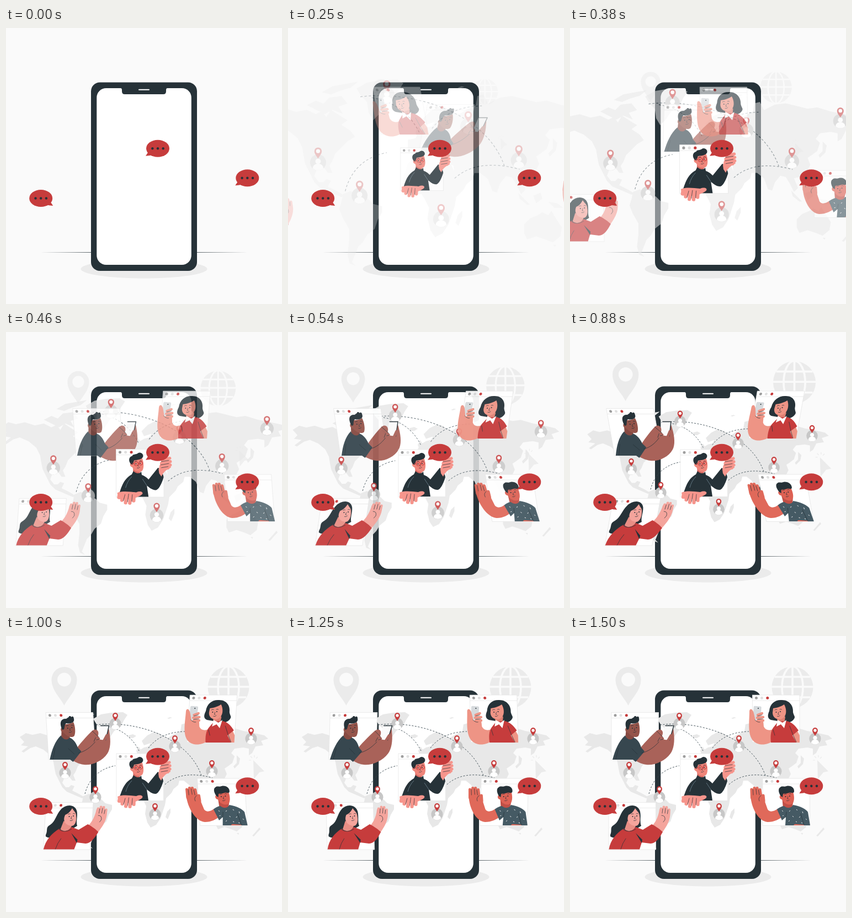
These frames come from a looping animation (500 px wide and 500 px high, 1.54 s). An HTML page:

```html
<!DOCTYPE html>
<html lang="en">
<head>
<meta charset="utf-8">
<title>Chatting around the world</title>
<style>
  html, body { margin: 0; height: 100%; overflow: hidden; background: #fafafa; }
  svg { display: block; width: 100vw; height: 100vh; }
  .dark { fill: #263238; }
  .red { fill: #c63c3c; }
  .pale { fill: #ebebeb; }
  .ink { fill: none; stroke: #263238; stroke-width: .7; stroke-linecap: round; stroke-linejoin: round; }
  .fingers { fill: none; stroke-linecap: round; stroke-linejoin: round; }
  .land { fill: #e8e8e8; }
  .route { fill: none; stroke: #37474f; stroke-width: .9; stroke-dasharray: 3 2.6; }
</style>
</head>
<body>
<svg viewBox="0 0 500 500">
  <defs>
    <g id="bubble">
      <path class="red" d="M-17 6L-22 13.5Q-14 13-8 11Z"/>
      <ellipse class="red" rx="21" ry="15.5"/>
      <g class="dark"><circle cx="-9.7" r="2.2"/><circle r="2.2"/><circle cx="9.7" r="2.2"/></g>
    </g>
    <g id="pin">
      <circle cy="14" r="10.6" fill="#c7c7c7"/>
      <path d="M-7 21.8C-7 13.5 7 13.5 7 21.8A10.6 10.6 0 0 1-7 21.8Z" fill="#fff"/>
      <circle cy="12.5" r="3.6" fill="#fff"/>
      <path class="red" d="M0 9C-2 5-4.9 3-4.9-1A4.9 4.9 0 0 1 4.9-1C4.9 3 2 5 0 9Z"/>
      <circle cy="-1" r="2.7" fill="#fff"/>
    </g>
    <g id="window">
      <rect width="85.5" height="85.5" fill="#fff" stroke="#e6e6e6" stroke-width=".8"/>
      <path d="M0 10H85.5" stroke="#e6e6e6" stroke-width=".8"/>
      <circle cx="7" cy="5.3" r="2.5" fill="#9e9e9e"/>
      <circle cx="17" cy="5.3" r="2.5" fill="#e0e0e0"/>
      <circle cx="27.3" cy="5.3" r="2.5" class="red"/>
    </g>
    <g id="face">
      <circle cx="-3.5" r="1" class="dark"/><circle cx="4" cy="-1" r="1" class="dark"/>
      <path class="ink" d="M-6-4q2-1.600 4-.8M3-5q1.800-1.300 3.500 0M.8 0l-1 4 1.600.2M-1.500 7.500q3.500 1 5-1.500"/>
    </g>
  </defs>

  <g id="icons">
    <path class="pale" fill-rule="evenodd" d="M105.500 126C99 112 82.500 99 82.500 79a23 23 0 0 1 46 0C128.500 99 112 112 105.500 126ZM105.500 66.500a12.500 12.500 0 1 0 .1 0Z"/>
    <circle cx="403" cy="93" r="37.5" class="pale"/>
    <g fill="none" stroke="#fafafa" stroke-width="3.6">
      <path d="M403 55V131M365 92H441M371 74H435M371 111H435"/>
      <ellipse cx="403" cy="93" rx="19" ry="38"/>
    </g>
    <path class="pale" d="M448 225L468 245 459 247 449 259Z"/>
    <path d="M446 221l-3-3M450 220v-4M444 225h-4M453 222l3-3" stroke="#ebebeb" stroke-width="1.2"/>
  </g>

  <ellipse cx="250" cy="436.5" rx="114.5" ry="17" class="pale"/>
  <path class="dark" d="M62 406.500L250 405.800 438 406.500 250 407.200Z"/>
  <rect x="154" y="98.5" width="192" height="341.5" rx="16" class="dark"/>
  <rect x="164.3" y="109" width="171.5" height="320" rx="17" fill="#fff"/>
  <path class="dark" d="M207 108.500q3 .5 3 4v2q0 5.500 5 5.500h70q5 0 5-5.500v-2q0-3.500 3-4Z"/>
  <path d="M241 111.800h18" stroke="#fff" stroke-width="2" stroke-linecap="round"/>

  <g id="map">
    <path class="land" d="M25 183L36 176 48 179 62 176 78 181 92 178 104 184 112 180 118 188 124 178 136 186 146 192 138 198 150 206 156 214 146 220 138 228 130 236 126 246 122 252 126 262 120 262 114 254 106 256 102 266 108 274 114 274 118 270 124 272 120 280 132 286 142 292 138 294 124 288 110 282 102 274 96 262 90 250 88 240 86 228 80 216 68 206 54 200 44 203 32 211 28 209 40 200 27 198 33 192Z
      M92 172l12-6 10 4 8-8 16-2 8 10-12 4 6 10-14-6-10 6-12-6Z M112 155l14-8 22-4 12-2-10 8-14 4-12 5Z
      M158 150L172 142 190 139 212 138 220 143 214 152 208 164 196 172 188 184 180 192 174 182 172 168 164 160Z
      M222 180l8-2 6 3-6 4-8-1Z M292 149l5-2 4 1-6 2Z
      M140 290L150 286 162 290 174 297 180 303 192 306 192 314 186 324 182 336 172 344 166 354 160 360 156 370 152 380 157 385 149 382 146 370 148 352 148 336 140 322 135 310 138 300Z"/>
    <path class="land" d="M222 262L226 250 236 240 252 237 262 240 276 243 284 252 290 266 296 274 306 272 300 284 290 294 288 306 284 318 280 330 272 342 262 347 256 338 252 322 254 308 248 296 244 290 230 290 222 282 218 272Z M292 318l6-6v8l-5 12-4-4Z
      M226 228V218L236 216 240 208 250 202 258 200 262 194 250 198 246 190 256 180 268 174 278 176 286 182 294 184 304 178 316 172 318 160 326 158 332 170 348 162 364 160 380 164 396 168 410 166 430 172 450 176 468 180 475 186 462 190 466 198 452 200 446 212 440 216 440 204 430 202 414 204 408 212 414 218 410 230 402 236 396 240 400 250 394 262 384 268 376 270 382 284 376 290 370 278 364 268 356 266 348 276 344 288 338 286 332 270 322 262 314 262 312 270 300 280 294 282 288 264 286 252 272 248 270 240 260 240 262 232 254 228 246 224 240 232 234 236 226 236Z
      M236 208l4-8 4 6 2 6-8 2Z M418 216l6 6-2 10-8 8-2-4 6-6Z
      M372 288l10 10 6 6h-4l-10-8Z M392 292l10-4 2 8-8 6Z M412 300l12 2 8 6h-12Z
      M380 330L388 322 398 318 404 314 412 318 416 312 422 322 430 334 428 346 418 354 408 350 396 346 384 350 380 342Z M418 357h4l-1 3Z M459 347l2 3-5 5-7 8-3-1 7-8Z"/>
    <path class="route" d="M163 161C235 152 330 183 354 253M178 162Q222 170 241 208M143 286C150 258 170 240 198 235M258 203Q280 174 324 173M288 269Q318 242 374 257"/>
    <use href="#pin" x="198" y="145"/><use href="#pin" x="107" y="234"/><use href="#pin" x="162" y="278"/>
    <use href="#pin" x="270" y="309"/><use href="#pin" x="373" y="231"/><use href="#pin" x="444" y="172"/>
    <use href="#pin" x="306" y="186"/>
  </g>

  <g id="topLeft">
    <use href="#window" x="75" y="138.5"/>
    <path d="M123 208C132 197 146 181 158 171 164 167 169 171 168 177L179 165C184 161 188 166 188 175 190 190 188 205 182 213 172 227 152 235 138 233 129 232 120 227 114 222Z" fill="#a96259"/>
    <path d="M102 166L100 186C105 193 115 192 116 182Z" fill="#874a42"/>
    <path d="M105 160C111 160 119 159 124 156 127 164 127 176 124 181 119 186 109 181 105 175 99 174 99 166 103 166Z" fill="#95544a"/>
    <path class="dark" d="M103 170C98 158 101 150 110 150 113 150 113 148 116 147 116 145 119 144 121 147 122 145 125 145 125 149 127 156 120 160 111 158 107 160 108 166 106 169Z"/>
    <path d="M77 224C82 206 88 191 100 180 103 188 111 190 115 184 123 187 127 195 129 202L135 209 119 228 114 224Z" fill="#37474f"/>
    <path class="ink" d="M112 204l10 10M88 203l-5 20M130 212C142 209 152 202 161 192M158 178l5 5-4 8M165 181l3 5"/>
    <path d="M172 162L188 162 181 189 165 188Z" fill="#fafafa"/>
    <path class="ink" d="M188 162.500L180.500 188.500M173 162.500H188" style="stroke-width:1.4"/>
    <g class="fingers" stroke="#a96259" stroke-width="4.5"><path d="M157 175L168 186M183 180L177 190M166 189L176 191"/></g>
    <path class="ink" d="M157 172l11 11M164 188l4-1"/>
    <use href="#face" x="116.500" y="167"/>
  </g>

  <g id="topRight">
    <use href="#window" x="330.5" y="107"/>
    <path class="dark" d="M364 152C357 149 358 143 361 136 362 122 372 115 384 116 398 116 405 127 404 138 405 144 409 146 406 150 401 158 388 160 376 154Z"/>
    <path d="M375 145L376 160 388 162 390 146Z" fill="#df8073"/>
    <path d="M368 131C376 130 384 127 388 124 392 131 393 141 388 147 380 155 367 150 367 139Z" fill="#ee9485"/>
    <path d="M402 176L412 172 416 180V193H409Z" fill="#ee9485"/>
    <rect x="332" y="127" width="14" height="25" rx="2" transform="rotate(4 339 139)" fill="#d6dadd"/>
    <circle cx="341" cy="131" r="1" class="dark"/>
    <path d="M325 137C325 155 321 178 332 190 343 201 360 196 366 191L372 167C363 172 355 172 351 164L350 153 336 153 333 140C331 131 325 130 325 137Z" fill="#ee9485"/>
    <g class="fingers" stroke="#ee9485" stroke-width="4.4"><path d="M340 143L348 140M339 148L350 147M340 153L350 153"/></g>
    <path class="ink" d="M340 145l8-2M340 151l9-1M335 152q5 5 9 4"/>
    <path class="red" d="M364 193C363 183 363 172 369 165L377 155 391 154C401 155 407 161 414 171L403 180 410 193Z"/>
    <path d="M376 152L374 164 382 160 388 167 392 152 385 157Z" fill="#fff"/>
    <path class="ink" d="M398 163l6 16 6 13M368 170l3 10"/>
    <use href="#face" x="377" y="138"/>
  </g>

  <g id="bottomLeft">
    <use href="#window" x="70" y="301.5"/>
    <path class="dark" d="M73 360C77 352 71 347 80 342 89 336 90 323 97 315 106 304 123 304 127 318 129 328 126 336 129 344L116 352 99 354C94 367 80 368 73 363Z"/>
    <path d="M104 335L99 350C106 357 118 352 119 343Z" fill="#e88e85"/>
    <path d="M106 324C112 322 116 316 118 312 122 318 126 320 126 326 128 337 124 345 118 344 109 343 101 336 106 324Z" fill="#f4a49c"/>
    <path d="M143 350C153 341 160 330 162 314L181 318C184 333 172 352 158 366Z" fill="#f4a49c"/>
    <g class="fingers" stroke="#f4a49c" stroke-width="4.8"><path d="M164 322L165 313M169 320L170 310M174 320L175 310.500M179 321L179.500 315"/></g>
    <path class="ink" d="M167 321l1-8M172 321l1-9M176.500 322l1-7M166 325q7 0 6 8l-3 4"/>
    <path class="red" d="M70.500 386.500C73 370 84 357 97 349 103 356 114 354 119 346L132 351 148 341C156 345 164 351 168 355 162 366 155 376 146 376L130 374 126 386.500Z"/>
    <path class="ink" d="M101 367q-6 8-9 19M96 350q10 8 23 0"/>
    <path class="dark" d="M119 357l12 12-1 6Z"/>
    <use href="#face" x="117" y="327"/>
  </g>

  <g id="bottomRight">
    <use href="#window" x="349" y="258"/>
    <path d="M384 290L386 312 402 312 405 298Z" fill="#c04f46"/>
    <path d="M383 284C392 285 399 281 404 282 407 291 407 302 401 305 392 307 386 301 384 296 379 296 378 288 383 288Z" fill="#dd6154"/>
    <path class="dark" d="M382 290C377 283 377 276 381 274 384 271 388 274 392 272 400 270 407 275 406 282 405 286 401 283 397 284 392 286 388 285 386 286L385 292Z"/>
    <path d="M327 288C328 312 342 336 358 337 370 337 380 332 386 326L376 313C369 318 362 320 358 314L352 297C350 284 339 280 329 280Z" fill="#e0695a"/>
    <g class="fingers" stroke="#e0695a" stroke-width="5.2"><path d="M329.500 293L329 278M335 290L334 275.500M340.500 290L339 275.500M346 292L344 278.500M351 299L350 289"/></g>
    <path class="ink" d="M332 288l-.6-10M338 287l-1-10M343 288l-1.500-9M346 289q-6 4-3 10"/>
    <path d="M375 314C381 309 386 308 388 308 394 313 401 312 404 306 418 308 428 314 431 319L435 343H390L391 328 384 334Z" fill="#455a64"/>
    <path d="M405 343q1-3 6-2l13 1v1Z" fill="#e0695a"/>
    <path d="M384 316l2 2M397 318l2-2M410 314l2 2M421 318l1 3M403 326l2 2M415 329l2-2M427 331l2 2M396 336l2-2M421 339l-2-1M409 336l2 1M385 326l2-1" stroke="#e6e6e6"/>
    <path class="ink" d="M391 328l1-9M418 322l6 20"/>
    <use href="#face" x="394" y="291"/>
  </g>

  <g id="middle">
    <use href="#window" x="200" y="213"/>
    <path d="M231 240L230 257C236 260 242 258 245 250Z" fill="#d66a62"/>
    <path d="M229 233C236 233 242 230 246 228 250 236 250 247 247 251 241 257 231 252 229 245 224 244 224 237 228 237Z" fill="#ef857a"/>
    <path class="dark" d="M227 240C221 234 223 226 229 225 230 221 236 223 239 220 244 217 250 222 248 227 245 232 238 232 232 233L230 240Z"/>
    <path class="dark" d="M204 298C210 278 214 266 228 258L231 252C236 257 242 257 245 253L246 259C252 261 255 264 258 267L275 246C279 249 284 255 285 263 282 274 276 286 271 286 264 286 259 281 255 278L258 298Z"/>
    <path d="M228 262q-8 8-11 20M247 266l8 12" fill="none" stroke="#78909c" stroke-width=".7"/>
    <path d="M276 249L281 232H296L298 246C290 249 284 255 281 262L277 256Z" fill="#f6958c"/>
    <g class="fingers" stroke="#f6958c" stroke-width="5.2"><path d="M284 232L296 229M281 238L297 235M280 243.500L297 241M281 248L293 246.500"/></g>
    <path class="ink" d="M281 235l13-2M280 241l14-2.500M281 246l12-2"/>
    <path d="M202 291C211 287 224 289 236 290 243 287 249 289 247 293 242 298 234 299 230 303L205 302Z" fill="#f6958c"/>
    <g class="fingers" stroke="#f6958c" stroke-width="6.2"><path d="M206 293L205 299M212 294L210.500 304M219 293L217 308.500M226 293L224.500 309M232 293L231.500 305"/></g>
    <path class="ink" d="M216 294l-3 11M222.500 293l-2 14M229 294l-1 12"/>
    <use href="#face" x="239" y="239"/>
    <g fill="none" stroke="#c63c3c"><circle cx="236" cy="239" r="3.500"/><circle cx="244" cy="238" r="3.200"/><path d="M228 238l4.500 1"/></g>
  </g>

  <use href="#bubble" x="275" y="218.2"/>
  <use href="#bubble" x="437.3" y="271.8"/>
  <use href="#bubble" transform="translate(63.2 308.5) scale(-1 1)"/>
</svg>
<script>
  const LOOP = 1540, FPS = 24;
  const byId = id => document.getElementById(id);

  const bezier = (u, a, b) => 3 * (1 - u) ** 2 * u * a + 3 * (1 - u) * u * u * b + u ** 3;

  // cubic-bezier(.36, -.01, .5, 1.38), which overshoots before it settles
  function ease(x) {
    if (x <= 0) return 0;
    if (x >= 1) return 1;
    let low = 0, high = 1;
    for (let i = 0; i < 24; i++) {
      const mid = (low + high) / 2;
      if (bezier(mid, .36, .5) < x) low = mid; else high = mid;
    }
    return bezier(low, -.01, 1.38);
  }

  function place(id, transform, opacity) {
    const node = byId(id);
    node.setAttribute('transform', transform);
    node.setAttribute('opacity', Math.max(0, Math.min(1, opacity)));
  }

  function zoom(id, cx, cy, from, p) {
    place(id, `translate(${cx} ${cy}) scale(${from + (1 - from) * p}) translate(${-cx} ${-cy})`, p);
  }

  // Slide in while leaning, lean past upright, swing back and settle
  function fly(id, cy, side, t) {
    const enter = ease(t / .9);
    const lean = t < .9 ? -20 + 30 * enter
      : t < 1.2 ? 10 - 12 * ease((t - .9) / .3)
      : -2 + 2 * ease((t - 1.2) / .3);
    place(id, `translate(${side * 250 * (1 - enter)} ${cy}) skewX(${side * lean}) translate(0 ${-cy})`, enter);
  }

  function draw(ms) {
    const step = Math.floor((ms % LOOP + 5) * FPS / 1000);
    const t = step < 2 ? 0 : (step + .5) / FPS;
    zoom('map', 250, 260, 1.5, ease(t));
    zoom('icons', 277, 155, .5, ease(t));
    zoom('middle', 243, 256, .5, ease(t / .5));
    fly('topLeft', 186, 1, t);
    fly('topRight', 152, -1, t);
    fly('bottomLeft', 344, -1, t);
    fly('bottomRight', 300, 1, t);
  }

  const start = performance.now();
  (function tick() {
    draw(performance.now() - start);
    requestAnimationFrame(tick);
  })();
</script>
</body>
</html>
```
